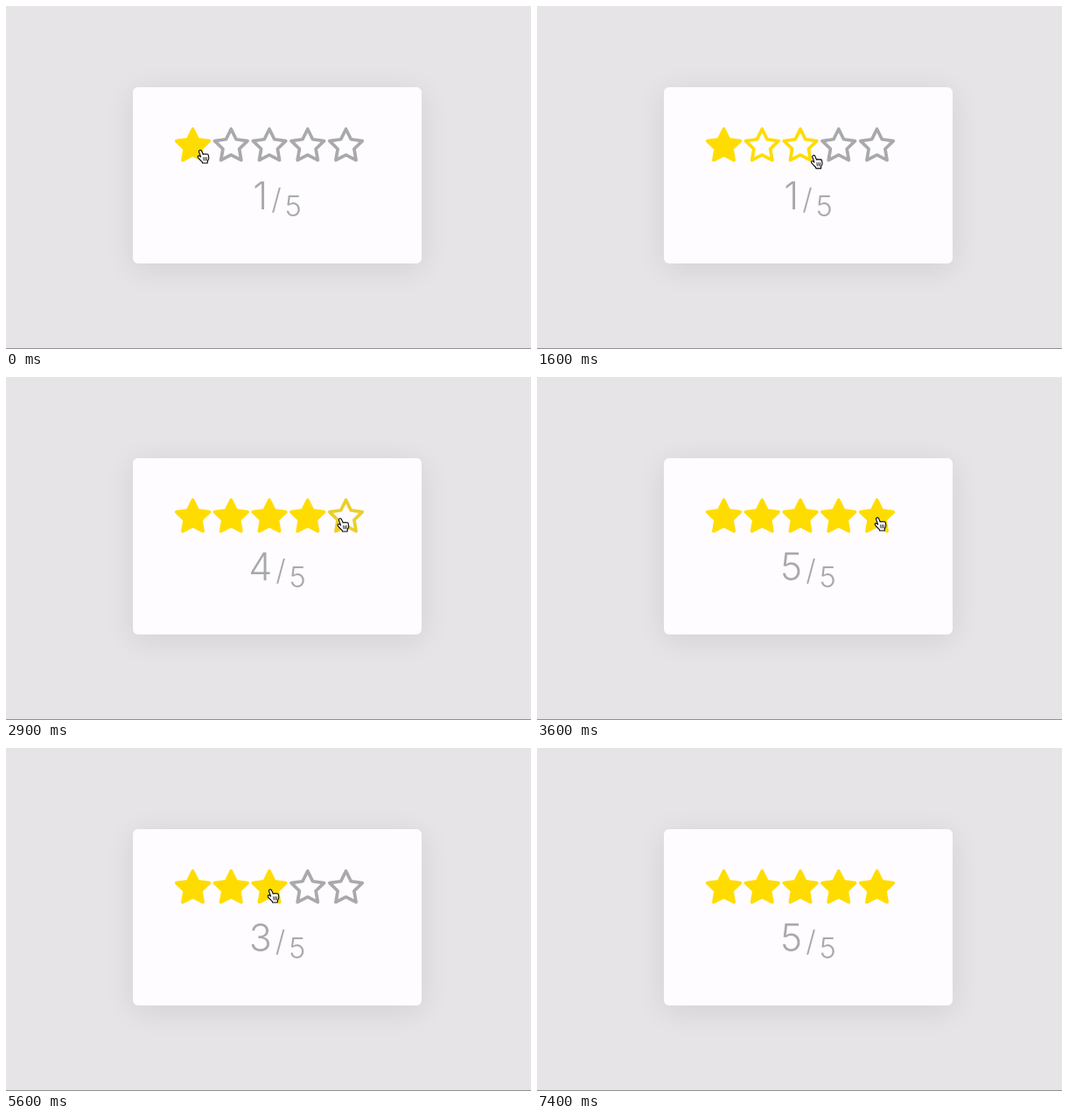
An HTML page that plays this animation: 600x393 px, repeating every 8200 ms.

```html
<!DOCTYPE html>
<html lang="en">
<head>
<meta charset="utf-8">
<title>Star rating</title>
<style>
  html, body { margin: 0; width: 100%; height: 100%; overflow: hidden; background: #e6e4e7; }
  .card {
    position: absolute; left: 145px; top: 93px; width: 330px; height: 202px;
    border-radius: 6px; background: #fefcff; box-shadow: 0 6px 34px rgba(0, 0, 0, .09);
  }
  .edge { position: absolute; left: 0; top: 392px; width: 600px; height: 1px; background: #929193; }
  svg { position: absolute; left: 0; top: 0; }
  text {
    font: 300 43px Inter, Roboto, sans-serif; font-optical-sizing: none;
    fill: #a9a9ab; text-anchor: middle;
  }
  .small { font-size: 33px; }
</style>
</head>
<body>
<div class="card"></div>
<div class="edge"></div>
<svg width="600" height="393">
  <g id="stars" stroke-width="3.75" stroke-linejoin="round"></g>
  <text x="310" y="232.5"><tspan id="digit"></tspan><tspan class="small" dx="4">/</tspan><tspan class="small" dx="4" dy="8">5</tspan></text>
  <g id="cursor" stroke-linejoin="round" stroke-linecap="round">
    <g id="hand" stroke="#000" stroke-width="1.1">
      <path fill="#fff" d="M3.2 1.2C4.4 .6 5.3 1.4 5.7 2.4L7.2 6Q8.2 5 9 6 10.2 5 11 6 12.6 5.2 13.2 6.6L13.8 10Q13.8 12 12.4 13.6L12.2 16H6.6L6.2 14.6Q4.4 13 1.6 9.8 .6 8.2 2 7.6 3.4 7.4 4.6 9L2.6 3.4Q2 1.8 3.2 1.2Z"/>
      <path fill="none" stroke-width=".8" d="M7.6 9.5 8 13M9.5 9.5 9.8 13M11.4 9.5V13"/>
    </g>
    <path id="arrow" fill="#000" stroke="#fff" d="M.5 .8V14.5L3.6 11.6 5.8 16.8 8 15.9 5.8 10.8H10.2Z"/>
  </g>
</svg>
<script>
const LOOP = 8200, STEP = 100, FADE = 200, CURSOR_GONE = 7400;
const COUNT = 5, PITCH = 43.75, FIRST_X = 213.5, STAR_Y = 160.7, RADIUS = 19.7;
const GRAY = [169, 169, 171], YELLOW = [255, 220, 0];
const HOVER_LAG = 8;

const home = { x: 218, y: 164 };
const moves = [
  { from: 0, to: 500, x: 221, y: 183 },
  { from: 500, to: 900, x: 226, y: 173 },
  { from: 900, to: 1400, x: 299, y: 172 },
  { from: 1500, to: 2200, x: 349, y: 165 },
  { from: 2400, to: 3300, x: 385, y: 160 },
  { from: 3900, to: 4800, x: 275, y: 161 },
  { from: 4800, to: 5200, x: 298, y: 161 },
  { from: 5600, to: 6600, x: 380, y: 155 },
  { from: 6800, to: 7200, x: 586, y: 37 }
];
const clicks = [2300, 3400, 5200, 6700];

const byId = id => document.getElementById(id);
const clamp = v => Math.max(0, Math.min(1, v));
const mix = (a, b, k) => a + (b - a) * k;
const easeOut = k => 1 - (1 - k) ** 2;
const show = (id, visible) => byId(id).setAttribute("visibility", visible ? "inherit" : "hidden");

function starPoints(cx, cy) {
  return Array.from({ length: 10 }, (_, i) => {
    const r = i % 2 ? RADIUS / 2 : RADIUS, angle = i * Math.PI / 5;
    return [cx + r * Math.sin(angle), cy - r * Math.cos(angle)];
  }).join(" ");
}

const stars = Array.from({ length: COUNT }, (_, i) => {
  const star = document.createElementNS("http://www.w3.org/2000/svg", "polygon");
  star.setAttribute("points", starPoints(FIRST_X + i * PITCH, STAR_Y));
  return byId("stars").appendChild(star);
});

function cursorAt(t) {
  return moves.reduce((p, m) => {
    const k = easeOut(clamp((t - m.from) / (m.to - m.from)));
    return { x: mix(p.x, m.x, k), y: mix(p.y, m.y, k) };
  }, home);
}

function starUnderCursor(t) {
  const x = cursorAt(t).x - HOVER_LAG;
  return Math.min(COUNT, Math.round((x - FIRST_X) / PITCH) + 1);
}

function ratingAt(t) {
  const click = clicks.filter(c => c < t).pop();
  return click ? starUnderCursor(click) : 1;
}

// Replays the fades from the start of the loop up to time t
function fadesAt(t) {
  const fades = stars.map((_, i) => ({ lit: +(i < 1), filled: +(i < 1) }));
  for (let s = STEP; s <= t; s += STEP) {
    const rating = ratingAt(s), reach = Math.max(rating, starUnderCursor(s));
    fades.forEach((fade, i) => {
      const amount = STEP / FADE;
      fade.lit = clamp(fade.lit + (i < reach ? amount : -amount));
      fade.filled = clamp(fade.filled + (i < rating ? amount : -amount));
    });
  }
  return fades;
}

function draw(t) {
  fadesAt(t).forEach(({ lit, filled }, i) => {
    const stroke = GRAY.map((c, j) => mix(c, YELLOW[j], easeOut(lit)));
    stars[i].setAttribute("stroke", `rgb(${stroke})`);
    stars[i].setAttribute("fill", `rgba(${YELLOW},${easeOut(filled)})`);
  });
  byId("digit").textContent = ratingAt(t);

  const { x, y } = cursorAt(t);
  const overStars = Math.abs(y - STAR_Y) < RADIUS;
  byId("cursor").setAttribute("transform", `translate(${x} ${y})`);
  show("cursor", t < CURSOR_GONE);
  show("hand", overStars);
  show("arrow", !overStars);
}

const start = performance.now();
function frame() {
  const t = (performance.now() - start) % LOOP;
  draw(Math.floor(t / STEP) * STEP);
  requestAnimationFrame(frame);
}
frame();
</script>
</body>
</html>
```
